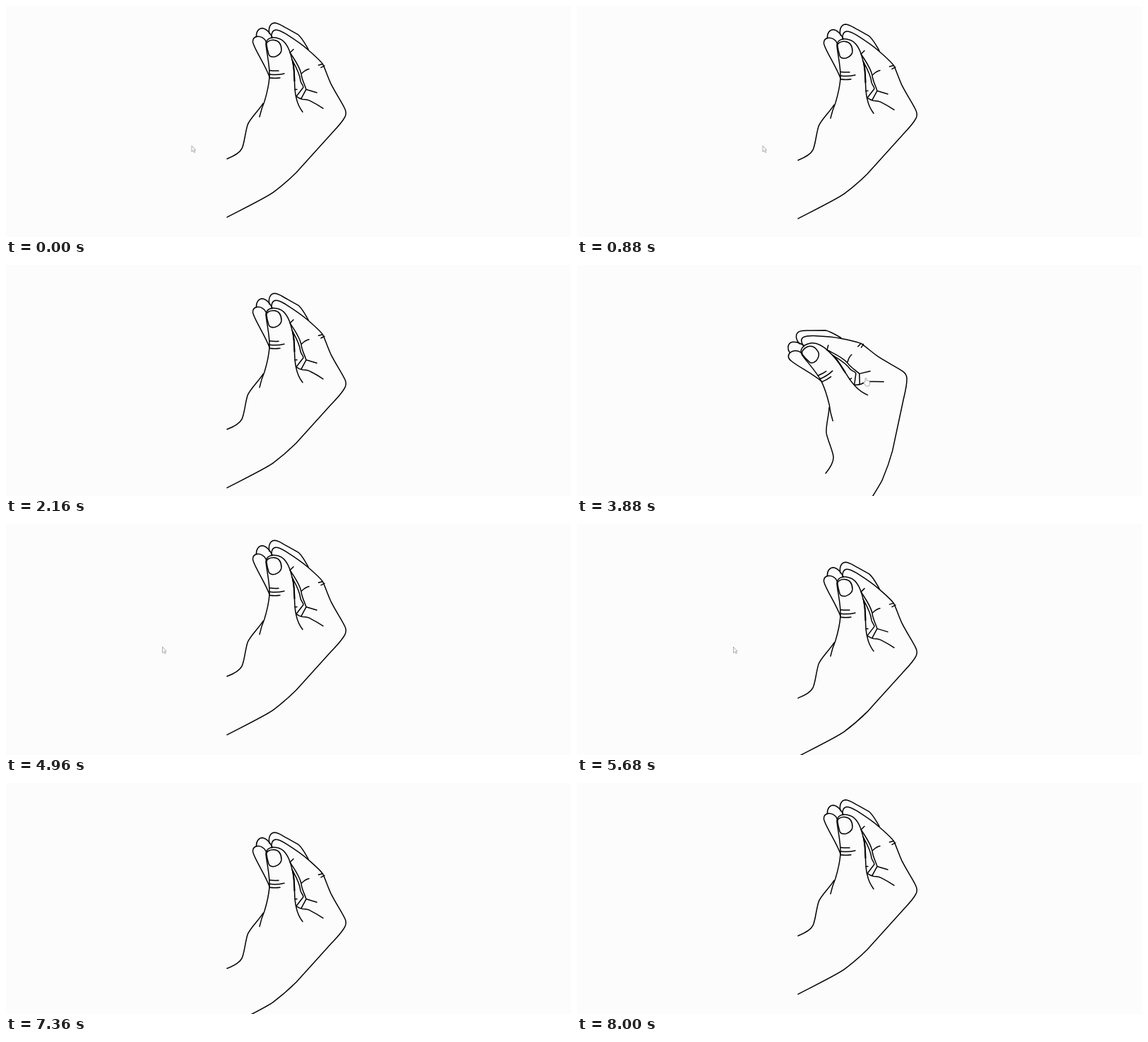
Recreate the animation shown at these times as an HTML page. Size 800 by 328 pixels, loop 8.04 s.

```html
<!DOCTYPE html>
<html lang="en">
<head>
<meta charset="utf-8">
<title>Hand gesture</title>
<style>
  html, body { margin: 0; width: 100%; height: 100%; overflow: hidden; background: #fcfcfc; }
  svg { display: block; width: 800px; height: 328px; }
  #hand { fill: none; stroke: #000; stroke-width: 1.5; stroke-linecap: round; stroke-linejoin: round; }
  .cursor { fill: #fff; stroke: #999; stroke-width: .8; stroke-linejoin: round; }
</style>
</head>
<body>
<svg viewBox="0 0 800 328">
  <g id="hand">
    <!-- index finger, back of the hand and forearm -->
    <path d="M376.500 45C375 38 378 33.500 382 33.500C387 33.500 391 36 396 39C407 46 418 53 428 62C436 69 445 77 448.500 82C452 89 455 99 460 110C467 124 476 137 480 146C482 150.500 482 153 480 157C476 165 468 173 461 180.500L411 236C404 243 388 257 378 264.500C369 271 341 285 313 299.500"/>
    <!-- fingers behind -->
    <path d="M373 39C371 31 374 24 380 23.500C386 23.500 391 28 398 31.500L414 40.500C420 46 424 54 428 61"/>
    <path d="M354.500 43C354 36 358 31 363 31C368 31.500 371 35 374 39L377 44"/>
    <path d="M368 50C366 45 360 42 355 43C350 44 348 49 350.500 54C355 66 367 84 373 100"/>
    <!-- thumb -->
    <path d="M359 157C361 148 363 142 366 135C369 125 372 113 373 101C374 85 369 66 368 54C368 46 376 43 384 45C394 47 400 58 403 68C406 78 408 86 408 97C409 108 408 119 411 130C413 140 417 146 420 150"/>
    <path d="M369 55C368 50 374 47.500 380 48C387 49 390 55 390 62C390 66 386 70 381 71.500C376 72.500 373 71 372 68C370.500 63 369.500 59 369 55Z"/>
    <path d="M373 91Q380 92 386 91.500M373 96.500Q384 98 394 95.500M373 101.500Q381 102.500 388 101.500"/>
    <!-- wrist -->
    <path d="M364 138C357 149 345 160 342 168.500C338.500 180 337.500 195 334 202C331 208 322 213 313 216.500"/>
    <!-- folds of the palm -->
    <path d="M403 67C410 78 416 86 418 96C419 105 423 111 425 118L440 122.500M405 76C410 85 416 95 417 106C418 110 421 112 421 115L411 128C415 131 417 131.500 420 132C426 132 428 132.500 432 135C438 138 443 141 449 145M425 118L418 131M409 118H412M402 66L407 61M419 95Q424 90 429 89M442.500 83.500L448 82M446 87L451 84.500"/>
    <path stroke-width="2" d="M406 78C408 86 408 95 408.500 106"/>
  </g>
  <path id="arrow" class="cursor" d="M0 0V8.500L2 6.700L3.600 9.700L4.800 9L3.300 6.200H5.600Z"/>
  <path id="pointer" class="cursor" d="M2 6V1Q3 0 4 1V4Q7 4 8.500 5.500V9L7.500 12H3L0 7.500Q0 6 2 6Z"/>
</svg>
<script>
const LOOP = 8040, STEP = 40, BEAT = 1000, DROP = 51.2;
const HOVER_IN = 2640, HOVER_OUT = 4600;
const hand = document.getElementById('hand');
const arrow = document.getElementById('arrow');
const pointer = document.getElementById('pointer');

// [from, to, x0, y0, x1, y1, shape]: the cursor glides, rests, or is hidden
const moves = [
  [0, 1920, 263, 198.5, 263, 198.5, arrow],
  [2600, 2640, 276, 180, 276, 180, arrow],
  [2640, 2920, 406, 143.5, 406, 143.5, pointer],
  [2920, 3880, 411, 160, 411, 160, pointer],
  [3880, 4080, 406, 160, 302, 161, pointer],
  [4080, 4600, 302, 161, 302, 161, pointer],
  [4600, 6480, 221.5, 174.5, 221.5, 174.5, arrow],
  [6480, 6640, 221.5, 174.5, 231.5, 111, arrow],
  [6640, 6920, 231.5, 111, 231.5, 111, arrow]
];

// cubic-bezier(.42, 0, .58, 1)
function easeInOut(x) {
  let lo = 0, hi = 1, u = .5;
  for (let i = 0; i < 20; i++) {
    u = (lo + hi) / 2;
    const bx = 1.26 * u * (1 - u) ** 2 + 1.74 * u * u * (1 - u) + u ** 3;
    if (bx < x) lo = u; else hi = u;
  }
  return u * u * (3 - 2 * u);
}

function drawHand(t) {
  if (t >= HOVER_IN && t < HOVER_OUT) {
    hand.setAttribute('transform', 'translate(-27.2 264.7) rotate(-30)');
    return;
  }
  const phase = (t + 40) % BEAT / BEAT;
  const y = DROP * easeInOut(1 - Math.abs(1 - 2 * phase)) - .2;
  hand.setAttribute('transform', `translate(0 ${y})`);
}

function drawCursor(t) {
  arrow.style.display = pointer.style.display = 'none';
  const move = moves.find(([from, to]) => t >= from && t < to);
  if (!move) return;
  const [from, to, x0, y0, x1, y1, shape] = move;
  const k = (t - from) / (to - from);
  shape.style.display = '';
  shape.setAttribute('transform', `translate(${x0 + (x1 - x0) * k} ${y0 + (y1 - y0) * k})`);
}

const start = performance.now();
function tick() {
  const elapsed = (performance.now() - start) % LOOP;
  const t = Math.floor(elapsed / STEP) * STEP;
  drawHand(t);
  drawCursor(t);
  requestAnimationFrame(tick);
}
tick();
</script>
</body>
</html>
```
